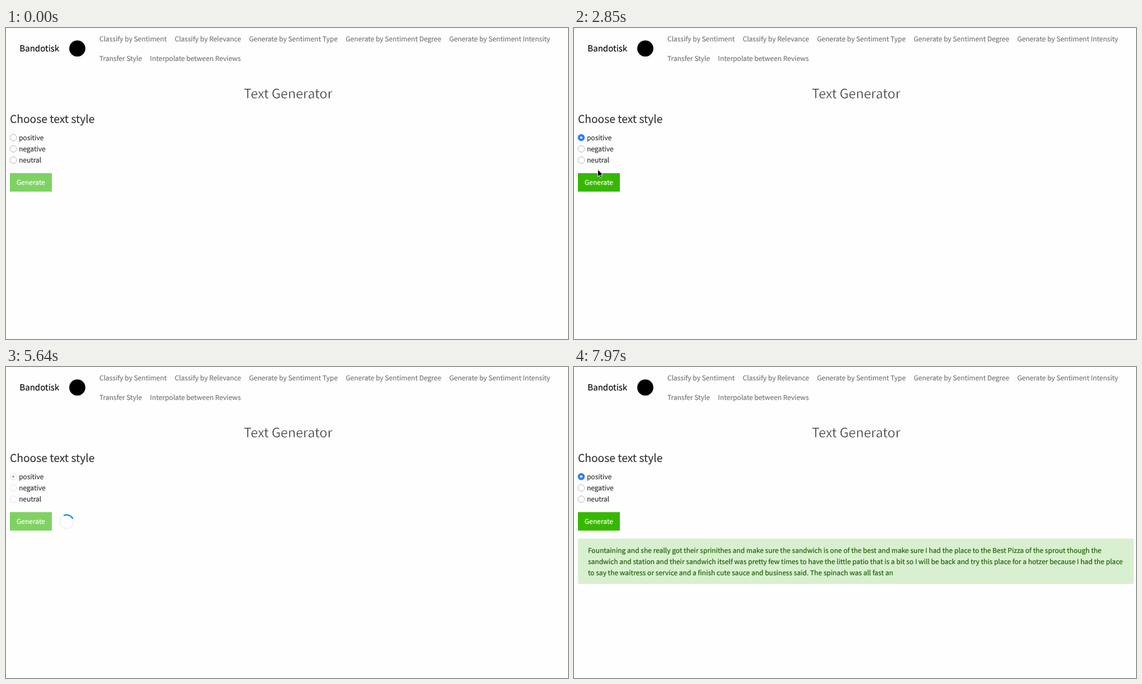
An HTML page that plays this animation: 1005 by 557 pixels, repeating every 8 s.

```html
<!DOCTYPE html>
<html lang="en">
<head>
<meta charset="utf-8">
<title>Text Generator</title>
<style>
  html, body { margin: 0; width: 100%; height: 100%; overflow: hidden; background: #fefefe; }
  svg { display: block; }
  text {
    font: 12.04px "Noto Sans CJK JP", "Noto Sans CJK SC", "Noto Sans CJK KR", "Noto Sans CJK TC", sans-serif;
    text-rendering: geometricPrecision;
    color: #333638;
    fill: currentColor;
    stroke: currentColor;
    stroke-width: .2px;
  }
  .nav { color: #787878; }
  .brand { font-size: 15.06px; color: #0c0c0c; }
  /* A background-coloured stroke thins the letters to a light weight. */
  .title { font-size: 23.45px; letter-spacing: -.1px; text-anchor: middle; stroke: #fefefe; stroke-width: .5px; }
  .heading { font-size: 19.28px; }
  .label { color: #fff; text-anchor: middle; }
  .result { color: #1c6000; }
</style>
</head>
<body>
<svg width="1005" height="557" viewBox="0 0 1005 557">
  <text class="brand" x="24.3" y="42.4">Bandotisk</text>
  <circle cx="127.5" cy="36.7" r="14.4"/>
  <g id="nav"></g>
  <text class="title" x="504.5" y="126">Text Generator</text>
  <text class="heading" x="6.9" y="170">Choose text style</text>

  <g id="choices" stroke-width=".9"></g>
  <circle id="dot" cx="13" cy="196.3"/>

  <rect id="button" x="7" y="260" width="75" height="33"/>
  <text class="label" x="44.5" y="281.4">Generate</text>

  <g id="spinner" fill="none" stroke-width="2.7">
    <circle cx="108.5" cy="277" r="12.1" stroke="#f3f3f3"/>
    <circle id="arc" cx="108.5" cy="277" r="12.1" stroke="#3498db" pathLength="4" stroke-dasharray="1 3"/>
  </g>

  <g id="result">
    <rect x="7" y="307.3" width="994" height="81.5" rx="3.6" fill="#d8f0d0"/>
  </g>

  <path id="cursor" d="M0 0V13L3 10.2L5 15L7.2 14.1L5.2 9.5H9.4Z" stroke="#fff" stroke-width=".9"/>
</svg>
<script>
const LOOP = 8000, SELECT = 1980, HOVER = 2940, LOAD = 3560, LEAVE = 3680, DONE = 7970;
const POINTER_STEP = 87, SPIN = 2000, LINE = 20.2;

const menu = [
  ["Classify by Sentiment", "Classify by Relevance", "Generate by Sentiment Type",
    "Generate by Sentiment Degree", "Generate by Sentiment Intensity"],
  ["Transfer Style", "Interpolate between Reviews"]
];
const styles = ["positive", "negative", "neutral"];
const review = [
  "Fountaining and she really got their sprinithes and make sure the sandwich is one of the best and make sure I had the place to the Best Pizza of the sprout though the",
  "sandwich and station and their sandwich itself was pretty few times to have the little patio that is a bit so I will be back and try this place for a hotzer because I had the place",
  "to say the waitress or service and a finish cute sauce and business said. The spinach was all fast an"
];

// Pointer moves; it rests at the end of each until `hide` or the next move.
const moves = [
  { start: 180, end: 270, from: [366, 430], to: [366, 430], hide: 270 },
  { start: 720, end: 980, from: [0, 202], to: [23, 185] },
  { start: 1155, end: 1330, from: [23, 185], to: [28.5, 194] },
  { start: 2150, end: 3140, from: [28.5, 194], to: [46.3, 269.5], hide: LEAVE }
];

const $ = id => document.getElementById(id);
const set = (id, attributes) => {
  for (const name in attributes) $(id).setAttribute(name, attributes[name]);
};
const show = (id, visible) => set(id, { visibility: visible ? "visible" : "hidden" });
const smooth = p => p * p * (3 - 2 * p);

function build() {
  $("nav").innerHTML = menu.map((items, row) => {
    const spans = items.map((item, i) => `<tspan dx="${i ? 14.36 : 0}">${item}</tspan>`);
    return `<text class="nav" x="167" y="${24 + row * 34.6}">${spans.join("")}</text>`;
  }).join("");
  $("choices").innerHTML = styles.map((name, i) => `
    <circle cx="13" cy="${196.3 + i * LINE}" r="5.9"/>
    <text x="22.9" y="${200.6 + i * LINE}">${name}</text>`).join("");
  $("result").innerHTML += review.map((line, i) =>
    `<text class="result" x="24.9" y="${332.8 + i * LINE}">${line}</text>`).join("");
}

function pointerAt(t) {
  const move = moves.findLast(m => m.start <= t);
  if (!move || t >= move.hide) return null;
  const { start, end, from, to } = move;
  const stepped = Math.floor((t - start) / POINTER_STEP) * POINTER_STEP;
  const p = smooth(Math.min(1, stepped / (end - start)));
  return from.map((v, i) => v + (to[i] - v) * p);
}

function buttonColor(t, loading) {
  if (loading && t < LEAVE) return "#76b861";
  if (loading || t < SELECT) return "#7ed262";
  return t >= HOVER && t < LOAD ? "#2d920c" : "#37b800";
}

function draw() {
  const t = performance.now() % LOOP;
  const loading = t >= LOAD && t < DONE;
  const selected = t >= SELECT;

  set("choices", { fill: "#fff", stroke: loading ? "#dedede" : "#acacac" });
  const blue = selected && !loading ? "#2b7ff6" : "";
  Object.assign($("choices").firstElementChild.style, { fill: blue, stroke: blue });
  show("dot", selected);
  set("dot", { fill: loading ? "#8e8e8e" : "#fff", r: loading ? 1.8 : 2.1 });
  set("button", { fill: buttonColor(t, loading) });

  show("spinner", loading);
  const angle = (t - LOAD) / SPIN * 360 + 5;
  set("arc", { transform: `rotate(${angle - 135} 108.5 277)` });
  show("result", t >= DONE);

  const pointer = pointerAt(t);
  show("cursor", pointer);
  if (pointer) set("cursor", { transform: `translate(${pointer})` });
  requestAnimationFrame(draw);
}

build();
draw();
</script>
</body>
</html>
```
